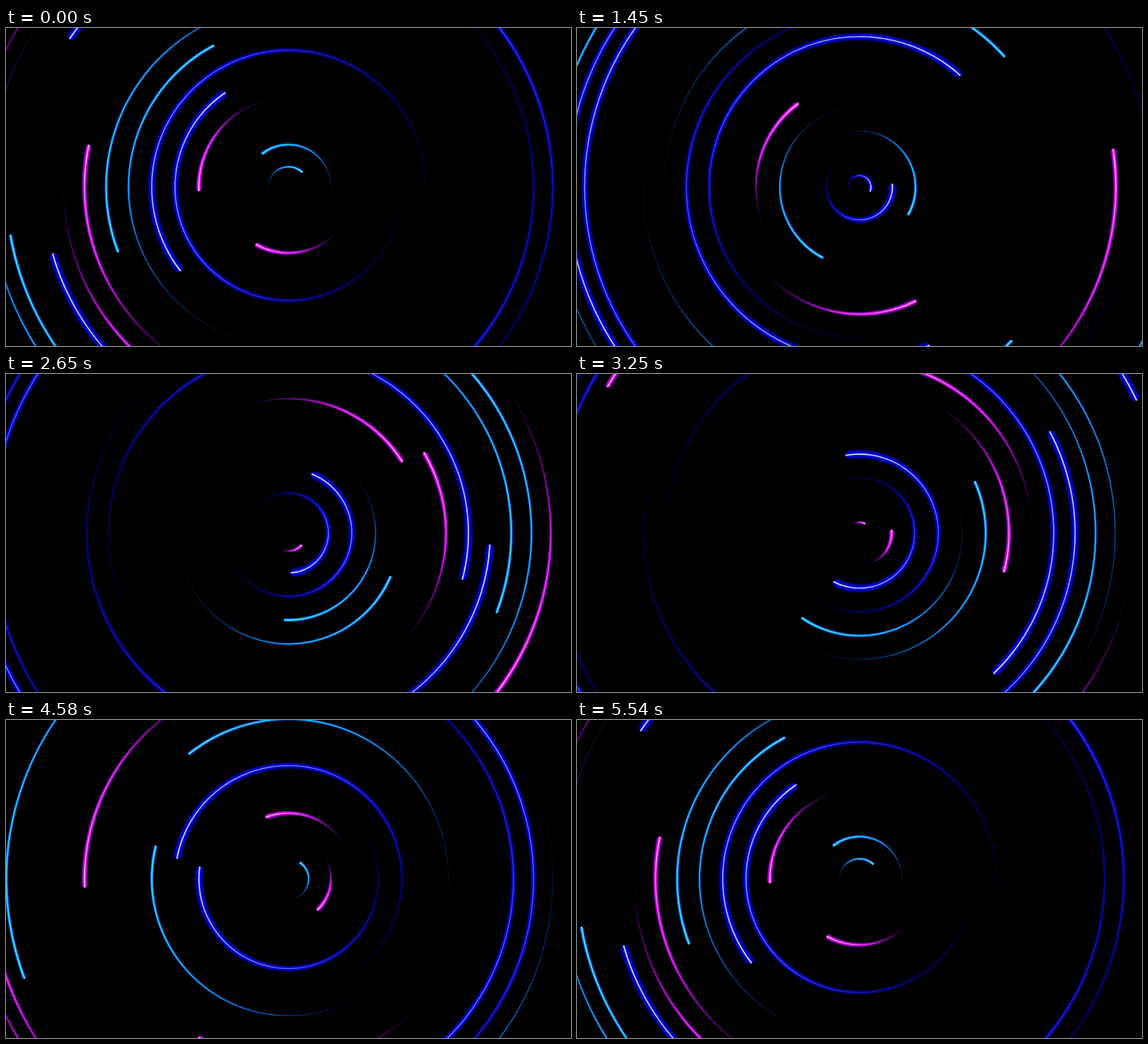
These frames come from a looping animation (853x480 px, 5.6 s). An HTML page with a canvas:

```html
<!DOCTYPE html>
<html lang="en">
<head>
<meta charset="utf-8">
<title>Neon rings</title>
<style>
  html, body { margin: 0; width: 100%; height: 100%; overflow: hidden; background: #000; }
  canvas { display: block; width: 853px; height: 480px; }
</style>
</head>
<body>
<canvas id="stage" width="853" height="480"></canvas>
<script>
const ctx = document.getElementById('stage').getContext('2d');
const CX = 426.5, CY = 240;
const LOOP = 5600, CYCLE = 5500, STEP = 60;
const RAD = Math.PI / 180;

// Stretches of even steps [first, last]; the picture rests between them.
const RUNS = [[0, 1140], [1270, 3550], [3680, 5540]];

// Ring radius at each whole age.
const RADII = [0, 30.5, 64, 99.5, 135.3, 171.3, 206.5, 241.5, 275.3,
  308, 339.7, 370, 399, 426, 451, 474, 495];
const MAX_AGE = RADII.length - 1;

// glow: [width, colour] from the outside in; core goes from head to tail colour.
const BLUE = {
  span: 241,
  glow: [[15, [0, 0, 62]], [12.5, [0, 0, 135]], [9.5, [0, 0, 195]], [3.4, [25, 25, 225]]],
  coreWidth: 1.9, head: [215, 222, 255], tail: [10, 10, 215]
};
const CYAN = {
  span: 144,
  glow: [[6, [0, 30, 110]], [4.6, [0, 90, 205]], [3.2, [10, 165, 235]]],
  coreWidth: 1.7, head: [85, 225, 235], tail: [0, 105, 235]
};
const PINK = {
  span: 79,
  glow: [[9.5, [45, 0, 85]], [7.5, [125, 0, 190]], [5.4, [215, 0, 205]]],
  coreWidth: 1.8, head: [255, 190, 235], tail: [140, 15, 225]
};

// age at loop start, head angle at birth, degrees turned per unit of age
const RINGS = [
  { style: CYAN, age: 1, angle: -93.7, turn: 48 },
  { style: CYAN, age: 2, angle: 15, turn: -72 },
  { style: PINK, age: 3, angle: -96, turn: 72 },
  { style: PINK, age: 4, angle: 105.3, turn: -72 },
  { style: BLUE, age: 5, angle: -3.7, turn: 48 },
  { style: BLUE, age: 6, angle: 70, turn: -48 }
];

const mix = (a, b, k) => a.map((v, i) => v + (b[i] - v) * k);
const rgb = (c, k) => `rgb(${c.map(v => Math.round(v * k)).join(',')})`;

function radiusAt(age) {
  const i = Math.min(Math.floor(age), MAX_AGE - 1), k = age - i;
  const b = RADII[i], c = RADII[i + 1];
  const a = i ? RADII[i - 1] : -27;
  const d = i + 2 <= MAX_AGE ? RADII[i + 2] : 2 * c - b;
  return b + k / 2 * (c - a + k * (2 * a - 5 * b + 4 * c - d + k * (3 * (b - c) + d - a)));
}

// One tapering stroke along a trail, starting so that its round end meets the tip.
function drawLayer(trail, width, minWidth, colourAt) {
  const { radius, head, dir, span } = trail;
  const start = Math.min(width / 2 / (radius * span), 0.4);
  const parts = Math.max(16, Math.ceil(radius * span / 7));
  const angleAt = s => head - dir * s * span;
  for (let i = 0; i < parts; i++) {
    const s = start + (1 - start) * i / parts;
    const w = width * (1 - s);
    if (!minWidth && w < 1) break;
    const from = angleAt(s);
    const to = angleAt(s + (1 - start) * 1.08 / parts);
    ctx.lineWidth = Math.max(w, minWidth);
    ctx.strokeStyle = ctx.fillStyle = colourAt(s);
    ctx.beginPath();
    ctx.arc(CX, CY, radius, from, to, dir > 0);
    ctx.stroke();
    if (i === 0) {
      ctx.beginPath();
      ctx.arc(CX + radius * Math.cos(from), CY + radius * Math.sin(from), w / 2, 0, 7);
      ctx.fill();
    }
  }
}

function drawRing({ style, angle, turn }, age) {
  const radius = Math.max(radiusAt(age), 0.5);
  const trail = {
    radius,
    head: (angle + turn * age) * RAD,
    dir: Math.sign(turn),
    span: style.span * RAD
  };
  const size = Math.min(1, 0.4 + radius / 70);
  const fade = s => Math.min(1, (1 - s) * 1.8);
  for (const [width, colour] of style.glow) {
    drawLayer(trail, width * size, 0, s => rgb(colour, fade(s)));
  }
  drawLayer(trail, style.coreWidth, 0.8, s =>
    rgb(mix(style.head, style.tail, Math.min(1, s * 1.4)), fade(s)));
}

function stepTime(t) {
  const [first, last] = RUNS.filter(run => run[0] <= t).pop();
  return Math.min(first + STEP * Math.floor((t - first) / STEP), last);
}

function draw() {
  const phase = 6 * Math.min(stepTime(performance.now() % LOOP) / CYCLE, 1);
  ctx.fillStyle = '#000';
  ctx.fillRect(0, 0, 853, 480);
  for (const ring of RINGS) {
    for (let age = (ring.age + phase) % 6; age < MAX_AGE; age += 6) {
      if (age > 0.02) drawRing(ring, age);
    }
  }
  requestAnimationFrame(draw);
}
draw();
</script>
</body>
</html>
```
